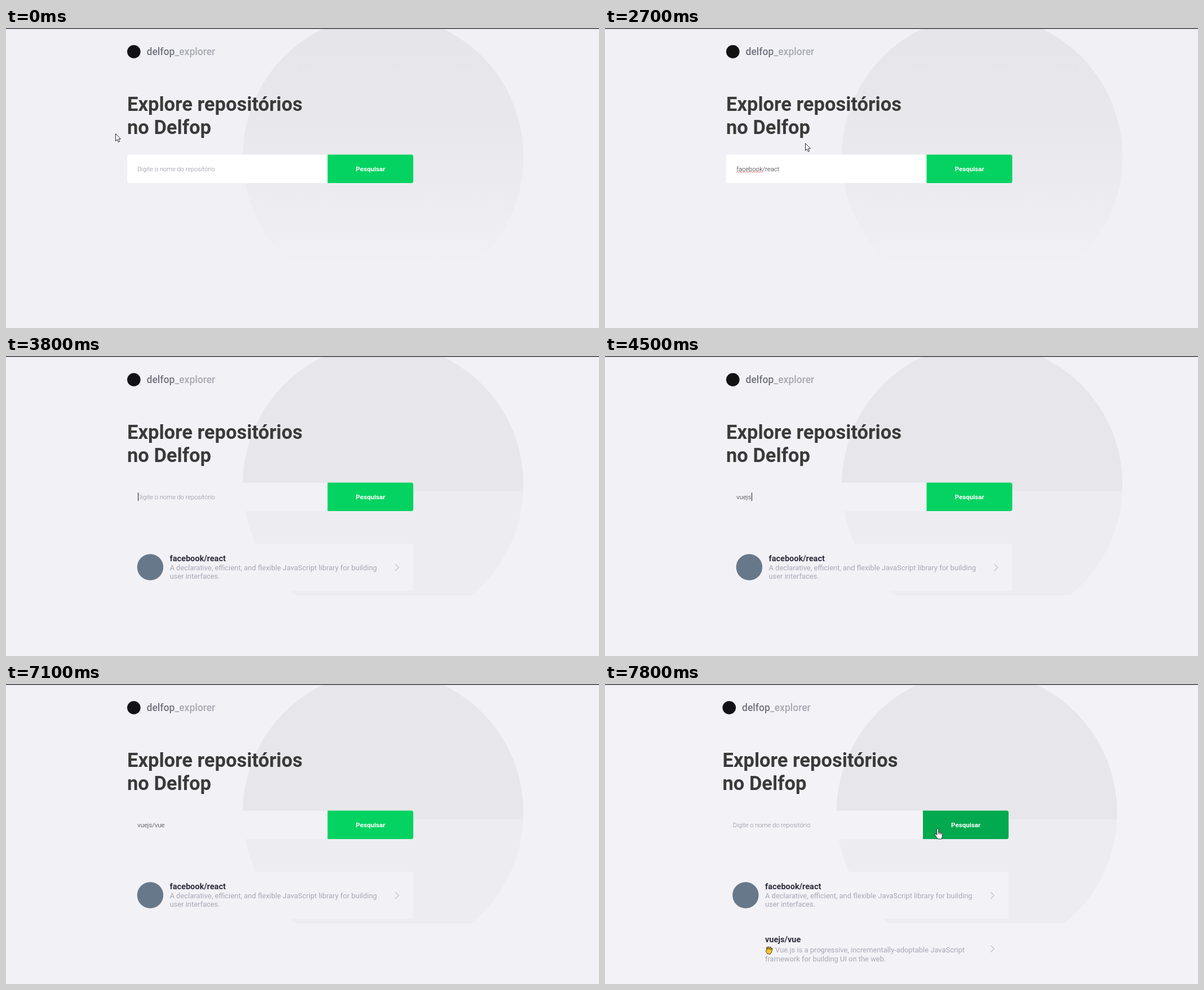
An HTML page that plays this animation: 1052x532 px, repeating every 8 s.

```html
<!DOCTYPE html>
<html lang="pt-BR">
<head>
<meta charset="utf-8">
<title>Explorador de repositórios</title>
<style>
  html, body { margin: 0; width: 100%; height: 100%; overflow: hidden; background: #f0f0f5; }
  svg { display: block; width: 100%; height: 100%; font-family: Roboto, Arial, sans-serif; }
  text { white-space: pre; }
  .title { font-size: 34.5px; font-weight: 700; fill: #3a3a3a; }
  .brand { font-size: 17.5px; font-weight: 500; fill: #737380; }
  .soft { fill: #a8a8b3; }
  .field { font-size: 11.4px; font-weight: 300; fill: #2a2a2a; }
  .hint { font-size: 11.15px; font-weight: 300; fill: #8d8d98; }
  .button { font-size: 11.6px; font-weight: 700; fill: #fff; }
  .name { font-size: 14.5px; font-weight: 700; fill: #2d2d3d; }
  .about { font-size: 12.92px; fill: #a8a8b3; }
  .chevron { fill: none; stroke: #c3c3cd; stroke-width: 1.4; }
  .pointer { fill: #fff; stroke: #111; stroke-width: .9; stroke-linejoin: round; }
</style>
</head>
<body>
<svg viewBox="0 0 1052 532">
  <defs>
    <linearGradient id="fade" gradientUnits="userSpaceOnUse" x1="0" y1="-24" x2="0" y2="426">
      <stop offset="0" stop-color="#e5e5e9"/>
      <stop offset=".5" stop-color="#e9e9ed"/>
      <stop offset="1" stop-color="#f0f0f5"/>
    </linearGradient>
    <linearGradient id="bands" gradientUnits="userSpaceOnUse" x1="0" y1="0" x2="0" y2="480">
      <stop offset=".5" stop-color="#e7e6ea"/>
      <stop offset=".5" stop-color="#edecf1"/>
    </linearGradient>
    <clipPath id="crop"><rect width="1052" height="424"/></clipPath>
  </defs>

  <rect id="back" width="1052" height="532"/>
  <g clip-path="url(#crop)"><ellipse id="disc" cy="228.5" rx="249" ry="251"/></g>
  <rect width="1052" height="1.5" fill="#37373c"/>

  <g id="page">
    <circle cx="226.8" cy="42" r="11.8" fill="#121214"/>
    <text class="brand" x="249.5" y="48">delfop<tspan class="soft">_explorer</tspan></text>
    <text class="title" x="215" y="147.3">Explore repositórios</text>
    <text class="title" x="215" y="187.8">no Delfop</text>

    <path id="box" d="M571 224.5H218.5a3.5 3.5 0 0 0-3.5 3.5v43.5a3.5 3.5 0 0 0 3.5 3.5h352.5z"/>
    <path id="button" d="M570.5 224.5h148.5a3.5 3.5 0 0 1 3.5 3.5v43.5a3.5 3.5 0 0 1-3.5 3.5h-148.5z"/>
    <text class="button" x="646.7" y="253.7" text-anchor="middle">Pesquisar</text>
    <text id="hint" class="hint" x="233.2" y="253.7">Digite o nome do repositório</text>
    <g id="waves" fill="none" stroke="#e0433a" stroke-width=".8"></g>
    <text id="typed" class="field" x="233.2" y="253.7"></text>
    <rect id="caret" y="242" width="1" height="15" fill="#222"/>

    <g id="first">
      <rect class="card" x="215" y="333" width="507.5" height="83" rx="3.5"/>
      <circle cx="255.9" cy="374.5" r="23.2" fill="#67788a"/>
      <text class="name" x="290.5" y="363.5">facebook/react</text>
      <text class="about" x="290.5" y="380">A declarative, efficient, and flexible JavaScript library for building</text>
      <text class="about" x="290.5" y="395.3">user interfaces.</text>
      <path class="chevron" d="M690.8 369.2l5.8 5.8-5.8 5.8"/>
    </g>

    <g id="second">
      <rect class="card" x="215" y="428" width="507.5" height="84" rx="3.5"/>
      <text class="name" x="290.5" y="458.3">vuejs/vue</text>
      <path d="M294.6 478.5l-3-5.2 1.5-1-.4-5 1.6-.4 1 4.2.1-5.2h1.6l1 4.8 1.6-4.6 1.4.4-.3 4.8 1.6-3 1.3.6-1.4 6-2.6 4.2z"
        fill="#ffc52f" stroke="#3b2b12" stroke-width=".9" stroke-linejoin="round"/>
      <text class="about" x="308.6" y="476.3">Vue.js is a progressive, incrementally-adoptable JavaScript</text>
      <text class="about" x="290.5" y="491.7">framework for building UI on the web.</text>
      <path class="chevron" d="M690.8 463.8l5.8 5.8-5.8 5.8"/>
    </g>
  </g>

  <path id="arrow" class="pointer" d="M.5.5v12.8l2.9-2.6 2.1 4.6 2-.9-2-4.5h3.9z"/>
  <g id="hand" class="pointer">
    <path d="M-1.3 11.5V1.5a1.5 1.5 0 0 1 3 0V7.2c.3-1.2 2.4-1 2.5.5.3-1.1 2.2-.9 2.3.6.5-.9 2.1-.5 2.1 1V13c0 2.5-1.3 3-1.3 5.6H-.3c-.3-2.2-2.3-4-4.3-7.4-1-1.7 1-2.6 2.1-1.1z"/>
    <path d="M1.7 7v3.2M4.2 7.6v2.8M6.5 8.3v2.4" fill="none"/>
  </g>
</svg>

<script>
const LOOP = 8000;
const $ = id => document.getElementById(id);

// [start, text, caret visible]
const typing = [
  [0, '', 0], [400, '', 1], [900, 'fa', 1], [1100, 'fac', 1], [1300, 'face', 1],
  [1600, 'facebook/', 1], [2100, 'facebook/', 0], [2200, 'facebook/r', 1],
  [2300, 'facebook/re', 1], [2600, 'facebook/react', 1], [2700, 'facebook/react', 0],
  [3000, 'facebook/react', 1], [3400, '', 0], [3800, '', 1], [4000, 'v', 1],
  [4500, 'vuejs', 1], [5000, 'vuejs', 0], [5200, 'vuejs/', 1], [5700, 'vuejs/', 0],
  [6000, 'vuejs/v', 1], [6500, 'vuejs/vu', 1], [6600, 'vuejs/vue', 1],
  [7100, 'vuejs/vue', 0], [7500, 'vuejs/vue', 1], [7800, '', 0]
];

// [start, pointer shape, x, y]
const pointing = [
  [0, 'arrow', 194, 187], [100, 'arrow', 200, 196], [200, 'arrow', 208, 207],
  [300, ''], [2700, 'arrow', 355, 204], [2800, 'hand', 655, 247],
  [3000, 'hand', 669, 249.5], [3700, ''], [7500, 'hand', 590, 256.3]
];

// [start, background, field and cards, page shift, disc x]
const scenes = [
  [0, '#f0f0f5', '#fff', 0, 669],
  [3400, '#f2f1f6', '#f2f1f6', 0, 669],
  [7800, '#f3f2f7', '#f3f2f7', -6.5, 659.5]
];

const at = (list, t) => list.findLast(step => step[0] <= t);
const show = (id, on) => $(id).setAttribute('display', on ? 'inline' : 'none');
const set = (id, name, value) => $(id).setAttribute(name, value);

function wave(from, to) {
  let d = '';
  for (let x = from, i = 0; x <= to; x += 2, i++) d += `${i ? 'L' : 'M'}${x} ${i % 2 ? 254.6 : 256.2}`;
  return `<path d="${d}"/>`;
}

function drawWaves(text, t) {
  const x0 = 233.5, slash = text.indexOf('/');
  const xAt = n => x0 + $('typed').getSubStringLength(0, n);
  let out = '';
  if (slash > 0 && (t < 3400 || t >= 7500)) {
    out = wave(x0, xAt(slash));
    if (t >= 7500) out += wave(xAt(slash + 1), xAt(text.length));
  }
  $('waves').innerHTML = out;
}

function draw(t) {
  const [, back, card, shift, discX] = at(scenes, t);
  set('back', 'fill', back);
  set('box', 'fill', card);
  document.querySelectorAll('.card').forEach(el => el.setAttribute('fill', card));
  set('page', 'transform', `translate(${shift})`);
  set('disc', 'cx', discX);
  set('disc', 'fill', t < 3400 ? 'url(#fade)' : 'url(#bands)');
  show('first', t >= 3400);
  show('second', t >= 7800);

  const [, text, caret] = at(typing, t);
  $('typed').textContent = text;
  show('hint', !text);
  show('caret', caret);
  set('caret', 'x', Math.round(233.7 + (text ? $('typed').getComputedTextLength() : 0)));
  drawWaves(text, t);

  const [, shape, x, y] = at(pointing, t);
  for (const id of ['arrow', 'hand']) {
    show(id, shape === id);
    if (shape === id) set(id, 'transform', `translate(${x} ${y})`);
  }
  set('button', 'fill', shape === 'hand' ? '#03a94e' : '#04d361');
}

const start = performance.now();
function tick() {
  draw((performance.now() - start) % LOOP);
  requestAnimationFrame(tick);
}
tick();
</script>
</body>
</html>
```
